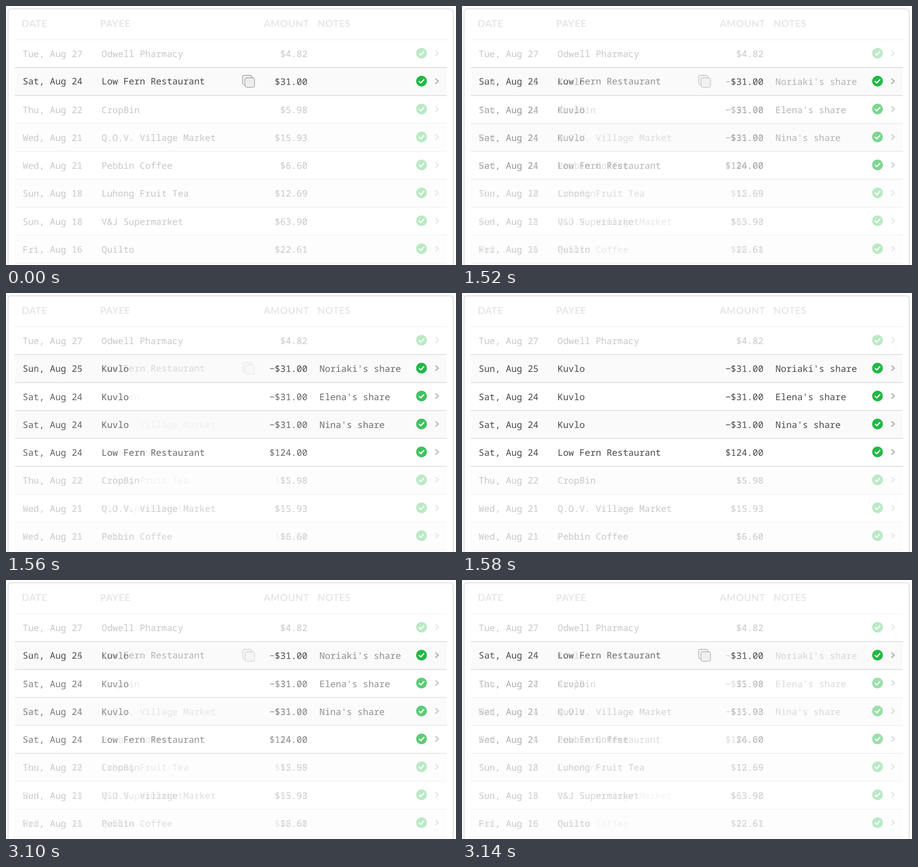
These frames come from a looping animation (985 px wide and 568 px high, 3160 ms). An HTML page:

```html
<!DOCTYPE html>
<html lang="en">
<head>
<meta charset="utf-8">
<title>Splitting a transaction</title>
<style>
  html, body { margin: 0; width: 100%; height: 100%; overflow: hidden; background: #fff; }
  svg { display: block; width: 100%; height: 100%; }
  text { font: 19.85px "Noto Sans Mono", monospace; fill: #4a4a4a; text-rendering: geometricPrecision; }
  .head text { font: 700 21px Lato, sans-serif; letter-spacing: 0.7px; fill: #e6e6e6; }
  .amount { text-anchor: end; }
  .faded { opacity: 0.3; }
  .rule { stroke: #dcdcdc; stroke-width: 1.8; }
  .chevron { fill: none; stroke: #b8b8b8; stroke-width: 3; }
  .tick { fill: none; stroke: #fff; stroke-width: 2.7; stroke-linecap: round; stroke-linejoin: round; }
  .copy { fill: #eee; stroke: #9a9a9a; stroke-width: 1.3; }
</style>
</head>
<body>
<svg viewBox="0 0 985 568">
  <g id="merged"></g>
  <g id="split" opacity="0"></g>
</svg>
<script>
const LOOP = 3160, SPLIT_AT = 1500, MERGE_AT = 3080, STEP = 20;
const TOP = 74, ROW = 61.22;

const pharmacy = ["Tue, Aug 27", "Odwell Pharmacy", "$4.82"];
const groceries = [
  ["Thu, Aug 22", "CropBin", "$5.98"],
  ["Wed, Aug 21", "Q.O.V. Village Market", "$15.93"],
  ["Wed, Aug 21", "Pebbin Coffee", "$6.60"],
];
const merged = [
  pharmacy,
  ["Sat, Aug 24", "Low Fern Restaurant", "$31.00"],
  ...groceries,
  ["Sun, Aug 18", "Luhong Fruit Tea", "$12.69"],
  ["Sun, Aug 18", "V&amp;J Supermarket", "$63.90"],
  ["Fri, Aug 16", "Quilto", "$22.61"],
];
const split = [
  pharmacy,
  ["Sun, Aug 25", "Kuvlo", "−$31.00", "Noriaki's share"],
  ["Sat, Aug 24", "Kuvlo", "−$31.00", "Elena's share"],
  ["Sat, Aug 24", "Kuvlo", "−$31.00", "Nina's share"],
  ["Sat, Aug 24", "Low Fern Restaurant", "$124.00"],
  ...groceries,
];

const text = (x, y, content, cls = "") => `<text x="${x}" y="${y}" class="${cls}">${content}</text>`;

const copyIcon = [[517.7, 152], [523.2, 157.5]]
  .map(([x, y]) => `<rect class="copy" x="${x}" y="${y}" width="20.8" height="20.8" rx="4"/>`).join("");

function row([date, payee, amount, note = ""], i, bright, lift) {
  const shade = i % 2 ? `<rect x="19" y="${TOP + i * ROW}" width="946" height="${ROW}" fill="#fafafa"/>` : "";
  const base = 112.2 + i * ROW;
  return `<g class="${bright ? "" : "faded"}">${shade}
    ${text(36.5, base - lift, date)}${text(209.3, base - lift, payee)}
    ${text(659.8, base, amount, "amount")}${text(686, base, note)}
    <g transform="translate(909.5 ${103.6 + i * ROW})">
      <circle r="11.7" fill="#21b945"/>
      <path class="tick" d="M-5 .6L-1.6 4L5 -3.2"/>
      <path class="chevron" d="M30.5 -5.8L36.7 0L30.5 5.8"/>
    </g></g>`;
}

// Rows 1..lastBright are emphasised; everything else is dimmed.
function table(rows, lastBright, lift, extra = "") {
  const isBright = i => i >= 1 && i <= lastBright;
  const rules = Array.from({ length: rows.length + 1 }, (_, i) => {
    const cls = isBright(i) || isBright(i - 1) ? "rule" : "rule faded";
    const y = TOP + i * ROW;
    return `<line class="${cls}" x1="19" x2="965" y1="${y}" y2="${y}"/>`;
  }).join("");
  return `<rect width="985" height="568" fill="#fff"/>
    <rect x="4.5" y="6.2" width="974.5" height="600" rx="6" fill="none" stroke="#d6d6d6" stroke-width="1.6"/>
    <g class="head">${text(34.5, 46, "DATE")}${text(206, 46, "PAYEE")}
      ${text(564, 46, "AMOUNT")}${text(682, 46, "NOTES")}</g>
    ${rows.map((r, i) => row(r, i, isBright(i), isBright(i) ? lift : 0)).join("")}${rules}${extra}`;
}

const layer = id => document.getElementById(id);
layer("merged").innerHTML = table(merged, 1, 1.5, copyIcon);
layer("split").innerHTML = table(split, 4, 0);

// Both crossfades advance by a fifth every 20 ms.
const fade = elapsed => elapsed < 0 ? 0 : Math.min(1, (Math.floor(elapsed / STEP) + 1) / 5);

function draw() {
  const t = performance.now() % LOOP;
  layer("split").setAttribute("opacity", fade(t - SPLIT_AT) - fade(t - MERGE_AT));
  requestAnimationFrame(draw);
}
draw();
</script>
</body>
</html>
```
